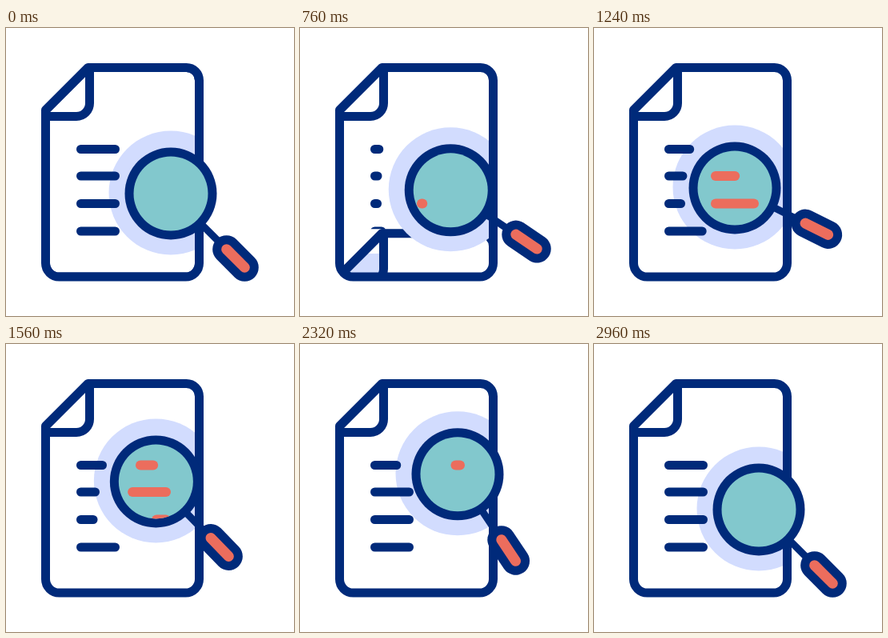
These frames come from a looping animation (360x360 px, 3000 ms). An HTML page with a canvas:

```html
<!DOCTYPE html>
<html lang="en">
<head>
<meta charset="utf-8">
<title>Document search</title>
<style>
  html, body { margin: 0; width: 100%; height: 100%; overflow: hidden; background: #fff; }
  canvas { display: block; width: 360px; height: 360px; }
</style>
</head>
<body>
<canvas id="stage" width="360" height="360"></canvas>
<script>
const LOOP = 3000;
const NAVY = '#002a7a', TEAL = '#82c8cd', RED = '#ec6d5d', HALO = '#d2dcfe';
const ROW_START = 93.5, ROW_END = 136.5, MARK_END = 200;
const ctx = document.getElementById('stage').getContext('2d');

const mix = (a, b, p) => a + (b - a) * p;
const progress = (t, start, length) => Math.min(1, Math.max(0, (t - start) / length));
const cubic = p => p < 0.5 ? 4 * p ** 3 : 1 - 4 * (1 - p) ** 3;
const sine = p => (1 - Math.cos(Math.PI * p)) / 2;

const rest = { x: 206, y: 207, angle: 45 };
const readLow = { x: 176, y: 200, angle: 26.6 };
const readHigh = { x: 195, y: 153, angle: 58.7 };
const moves = [
  { start: 412, length: 655, from: rest, to: readLow },
  { start: 1240, length: 600, from: readLow, to: readHigh },
  { start: 2000, length: 900, from: readHigh, to: rest }
];

// A row grows to its stub, is marked red under the lens, then fills up after the mark leaves.
const rows = [
  { y: 151.5, stub: 120.5, markStart: 168, mark: 1360, leave: 1990 },
  { y: 185, stub: 111.5, markStart: 152, mark: 1040, leave: 1510 },
  { y: 219.5, stub: 109, markStart: 152, mark: 720, leave: 1260 },
  { y: 254, stub: ROW_END }
];

const page = new Path2D(
  'M102.5 49.5H225.5A16 16 0 0 1 241.5 65.5V294A17 17 0 0 1 224.5 311' +
  'H66.5A17 17 0 0 1 49.5 294V102.5Z');
const fold = new Path2D('M104.5 49.5V94A16.5 16.5 0 0 1 88 110.5H49.5V102.5L102.5 49.5Z');

function lensAt(t) {
  const { start, length, from, to } = moves.findLast(m => t >= m.start) || moves[0];
  const p = cubic(progress(t, start, length));
  return {
    x: mix(from.x, to.x, p),
    y: mix(from.y, to.y, p),
    angle: mix(from.angle, to.angle, p)
  };
}

function outline(path) {
  ctx.lineWidth = 11;
  ctx.strokeStyle = NAVY;
  ctx.stroke(path);
}

function bar(x0, x1, y, color, width = 11) {
  ctx.beginPath();
  ctx.moveTo(x0, y);
  ctx.lineTo(x1, y);
  ctx.lineWidth = width;
  ctx.strokeStyle = color;
  ctx.stroke();
}

function disc(x, y, r, color) {
  ctx.beginPath();
  ctx.arc(x, y, r, 0, Math.PI * 2);
  ctx.fillStyle = color;
  ctx.fill();
}

function drawOldSheet(shift) {
  ctx.save();
  ctx.translate(0, shift);
  ctx.fillStyle = '#fff';
  ctx.fill(page);
  ctx.save();
  ctx.clip(fold);
  ctx.fillStyle = HALO;
  ctx.fillRect(44, 282 - shift, 66, 40);
  ctx.restore();
  outline(page);
  outline(fold);
  ctx.restore();
}

function drawNewRows(t, shift) {
  ctx.save();
  ctx.beginPath();
  ctx.rect(0, 0, 360, 44 + shift);
  ctx.clip();
  for (const { y, stub, leave } of rows) {
    const grown = mix(ROW_START, stub, progress(t, 640, 620));
    const fill = leave ? cubic(progress(t, leave + 290, 260)) : 0;
    bar(ROW_START, mix(grown, ROW_END, fill), y, NAVY);
  }
  ctx.restore();
}

function drawMarks(t) {
  for (const { y, markStart, mark, leave } of rows) {
    if (!(t > mark && t < leave + 400)) continue;
    const left = mix(markStart, MARK_END, progress(t, leave, 400));
    const right = mix(markStart, MARK_END, sine(progress(t, mark, 400)));
    bar(left, right, y, RED, 12);
  }
}

function drawLens(t, { x, y, angle }) {
  ctx.save();
  ctx.translate(x, y);
  ctx.rotate(angle * Math.PI / 180);
  bar(56, 90, 0, NAVY, 9);
  bar(98.5, 130.5, 0, NAVY, 35);
  bar(98.5, 130.5, 0, RED, 13);
  ctx.restore();

  disc(x, y, 57.5, NAVY);
  disc(x, y, 46.5, TEAL);
  ctx.save();
  ctx.clip();
  drawMarks(t);
  ctx.restore();
}

function draw(t) {
  const lens = lensAt(t);
  const shift = mix(0, 268, cubic(progress(t, 330, 700)));

  ctx.fillStyle = '#fff';
  ctx.fillRect(0, 0, 360, 360);
  ctx.lineCap = ctx.lineJoin = 'round';

  ctx.save();
  ctx.clip(page);
  outline(fold);
  if (shift < 268) drawOldSheet(shift);
  disc(lens.x, lens.y - 1, 77.5, HALO);
  drawNewRows(t, shift);
  if (shift < 268) {
    for (const { y } of rows) bar(ROW_START, ROW_END, y + shift, NAVY);
  }
  ctx.restore();

  outline(page);
  drawLens(t, lens);
}

const start = performance.now();
function tick() {
  draw((performance.now() - start) % LOOP);
  requestAnimationFrame(tick);
}
tick();
</script>
</body>
</html>
```
